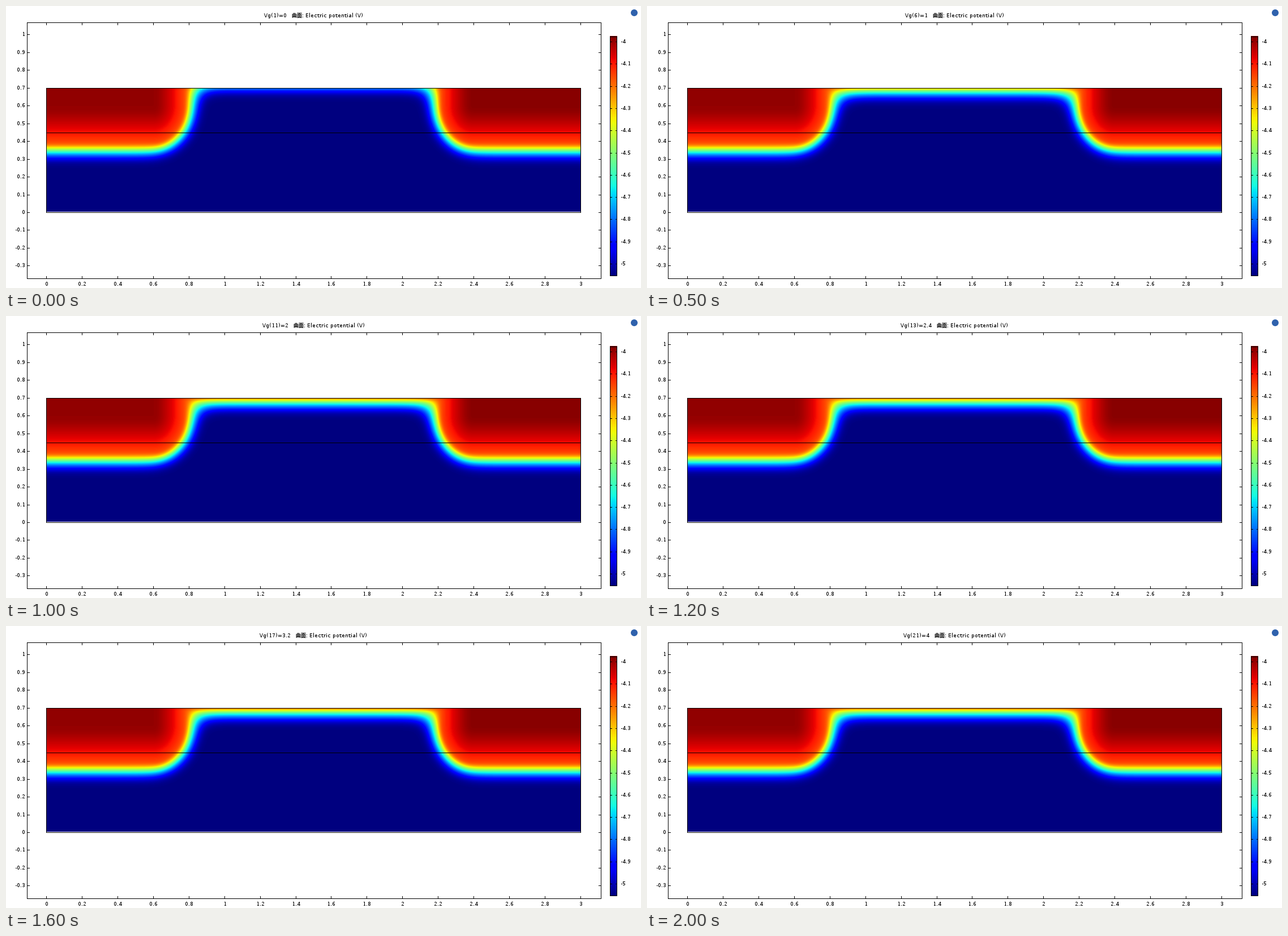
A matplotlib script for the animation above (2100 ms loop, 1122 by 499 pixels).

```python
import matplotlib.pyplot as plt
import numpy as np
from matplotlib.animation import FuncAnimation
from matplotlib.patches import Circle, Rectangle

W, H, DPI = 1122, 499, 128
PX = 72 / DPI
STEPS = 21
plt.rcParams.update({
    "font.family": ["DejaVu Sans", "Noto Sans CJK JP"],
    "text.hinting": "default",
    "text.hinting_factor": 1,
})

# Device rectangle in pixels; it spans 3 x 0.7 units
LEFT, RIGHT, TOP, BOTTOM = 71.5, 1015.5, 144.5, 364.5
UNIT = (RIGHT - LEFT) / 3

# Poisson model, potentials scaled to the colour range
CELL = 2                      # grid step, px
CHARGE = 2 / 37.1 ** 2        # acceptor charge per px^2
VT = 0.024                    # thermal voltage
PHI_N = 0.785                 # level where electrons equal acceptors
OXIDE = 24.0                  # equivalent oxide thickness, px
COL0, COLS, ROWS = 60, 126, 76
HALF, DEPTH = 237, 111


def solve(gates):
    """Potential around the left junction, for every gate voltage at once."""
    x = (COL0 + np.arange(COLS)) * CELL
    y = np.arange(ROWS)[:, None] * CELL
    s = np.hypot(np.clip(x - 0.6 * UNIT, 0, None) / 72.4,
                 np.clip(y - 0.1 * UNIT, 0, None) / 86.4)
    log_d = 6.9 * (1 - (s / 0.91) ** 2)
    donors = np.exp(log_d)
    neutral = PHI_N + VT * (log_d + 1.26e-3 * donors)
    tail = 0.83 * np.clip(1 - (s - 0.77) / 0.5, 0, 1) ** 2
    start = np.where(s < 0.77, neutral, tail)

    free = s >= 0.55
    parity = np.add.outer(np.arange(ROWS), np.arange(COLS)) % 2
    masks = [free & (parity == c) for c in (0, 1)]

    phi = np.repeat(start[None], len(gates), axis=0)
    vg = (0.96 + 0.927 * gates)[:, None]
    k = CELL ** 2 * CHARGE
    g = 2 * CELL / OXIDE
    for _ in range(160):
        for mask in masks:
            p = np.pad(phi, ((0, 0), (1, 1), (1, 1)), mode="edge")
            p[:, 0, 1:-1] = phi[:, 1] + g * (vg - phi[:, 0])
            p[:, -1] = 0
            holes = np.exp(-phi / VT)
            electrons = np.exp((phi - PHI_N) / VT)
            res = (p[:, :-2, 1:-1] + p[:, 2:, 1:-1] + p[:, 1:-1, :-2]
                   + p[:, 1:-1, 2:] - 4 * phi
                   - k * (1 - holes + electrons - donors))
            diag = 4 + k * (holes + electrons) / VT
            diag[:, 0] += g
            step = np.clip(1.6 * res / diag, -0.08, 0.08)
            phi = np.clip(phi + step * mask, 0, 1)
    return phi


def whole(part):
    """Extend the solved window over the device and mirror it."""
    half = np.pad(part, ((0, 0), (COL0, HALF - COL0 - COLS)), mode="edge")
    half = np.pad(half, ((0, DEPTH - ROWS), (0, 0)))
    field = np.hstack([half, half[:, -2::-1]])
    bias = np.clip((np.arange(field.shape[1]) - 260) / 60, 0, 1)
    return field * (1 + 0.01 * bias)


volts = 0.2 * np.arange(STEPS)
fields = [whole(f) for f in solve(volts)]

fig = plt.figure(figsize=(W / DPI, H / DPI), dpi=DPI, facecolor="white")
ax = fig.add_axes([0, 0, 1, 1])


def line(x0, y0, x1, y1):
    ax.plot([x0, x1], [y0, y1], color="black", lw=PX, antialiased=False,
            solid_capstyle="butt", zorder=4)


def frame(x0, y0, x1, y1):
    ax.add_patch(Rectangle((x0, y0), x1 - x0, y1 - y0, fill=False, ec="black",
                           lw=PX, antialiased=False, zorder=4))


def label(x, y, s, ha):
    return ax.text(x, y + 3.5, s, ha=ha, va="baseline", fontsize=9 * PX,
                   color="black", zorder=5)


# Potential surface
surface = ax.imshow(fields[0], cmap="jet", vmin=0, vmax=1, aspect="auto",
                    interpolation="bilinear", interpolation_stage="data",
                    extent=(LEFT - 1, RIGHT + 1, BOTTOM + 1, TOP - 1))
clip = Rectangle((LEFT, TOP), RIGHT - LEFT, BOTTOM - TOP,
                 transform=ax.transData)
surface.set_clip_path(clip)
frame(LEFT, TOP, RIGHT, BOTTOM)
line(LEFT, 223.5, RIGHT, 223.5)

# Plot frame and ticks
X0, X1, Y0, Y1 = 37.5, 1051.5, 28.5, 481.5
frame(X0, Y0, X1, Y1)
for i in range(16):
    x = np.floor(LEFT + 0.2 * i * UNIT) + 0.5
    line(x, Y0, x, Y0 + 4)
    line(x, Y1, x, Y1 - 4)
    label(x + 0.5, 491.5, f"{0.2 * i:g}", "center")
for i in range(-3, 11):
    y = np.floor(BOTTOM - 0.1 * i * UNIT) + 0.5
    line(X0, y, X0 + 4, y)
    line(X1, y, X1 - 4, y)
    label(34, y, f"{i / 10:g}", "right")

# Colour bar
ax.imshow(np.linspace(1, 0, 424)[:, None], cmap="jet", vmin=0, vmax=1,
          aspect="auto", extent=(1067, 1080, 477, 53))
frame(1067.5, 53.5, 1079.5, 476.5)
for i in range(11):
    y = np.floor(62.5 + 39.3 * i) + 0.5
    line(1067.5, y, 1070, y)
    line(1077, y, 1079.5, y)
    label(1086, y, f"{-4 - i / 10:g}", "left")

ax.add_patch(Circle((1110, 12), 6, color="#2f62ad", lw=0))
title = label(543.5, 16.5, "", "center")

ax.set_xlim(0, W)
ax.set_ylim(H, 0)
ax.axis("off")


def update(i):
    surface.set_data(fields[i])
    title.set_text(f"Vg({i + 1})={volts[i]:g}   曲面: Electric potential (V)")
    return surface, title


anim = FuncAnimation(fig, update, frames=STEPS, interval=100, repeat=True,
                     repeat_delay=0, blit=False, cache_frame_data=False)
plt.show()
```
